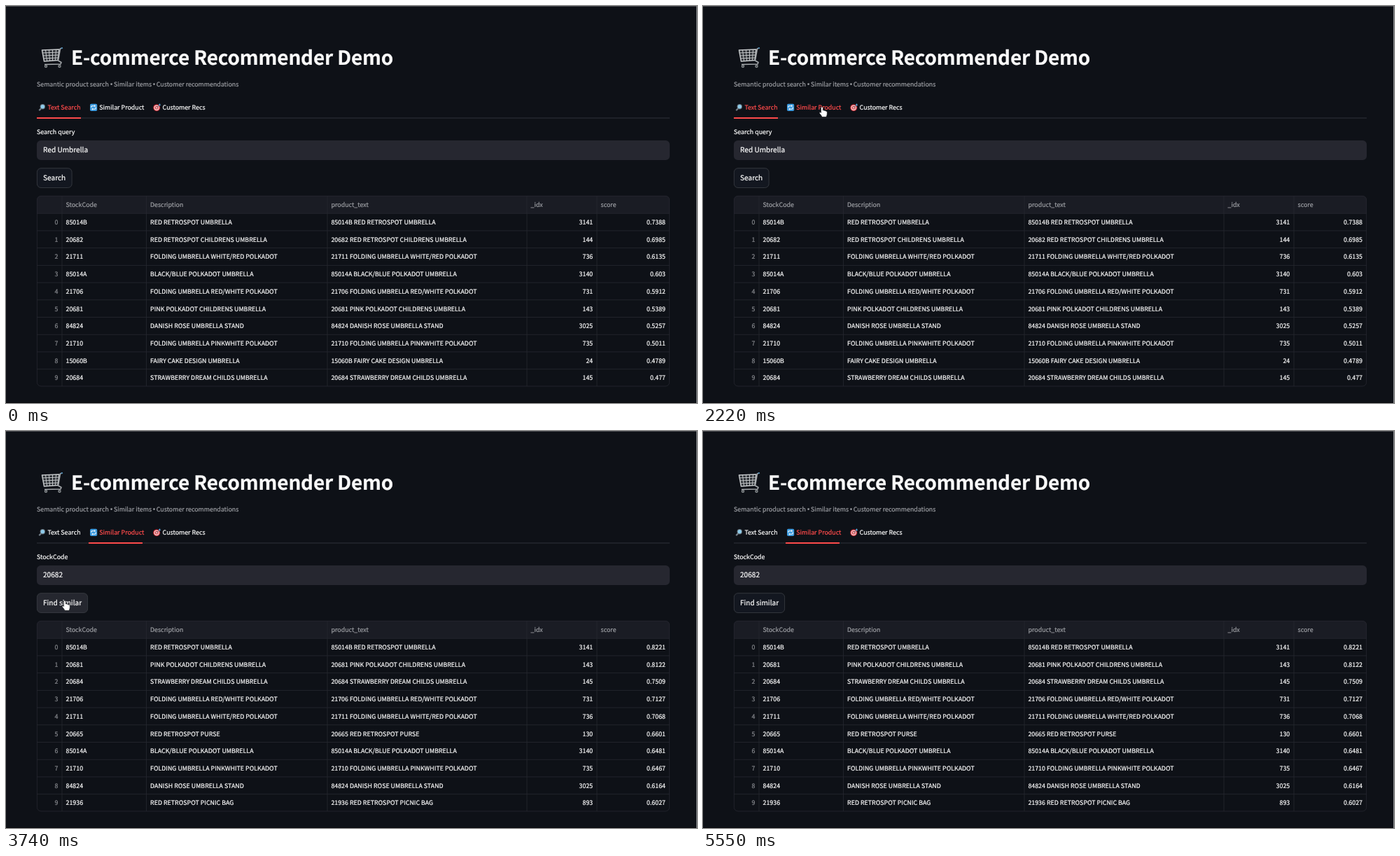
These frames come from a looping animation (987x567 px, 6.21 s). An HTML page with a canvas:

```html
<!DOCTYPE html>
<html lang="en">
<head>
<meta charset="utf-8">
<title>Recommender demo</title>
<style>
  html, body { margin: 0; width: 100%; height: 100%; overflow: hidden; background: #0e1117; }
  canvas { display: block; }
</style>
</head>
<body>
<canvas id="stage" width="987" height="567"></canvas>
<script>
const ctx = document.getElementById('stage').getContext('2d');
const LOOP = 6210;
const FONT = '"Noto Sans CJK JP", "Noto Sans CJK SC", "Noto Sans CJK", "Noto Sans", sans-serif';
const SMALL = 8.85, MEDIUM = 10.1, LARGE = 27.9;
const BG = '#0e1117', WHITE = '#fafafa', GREY = '#9a9ca1', RED = '#ff4b4b';
const LINE = '#262830', PANEL = '#262730', HEADER = '#1a1c24';
const TABLE = { left: 44, right: 948, top: 271, body: 296.2, row: 24.72 };

const PRODUCTS = {
  '85014B': ['RED RETROSPOT UMBRELLA', 3141],
  '20682': ['RED RETROSPOT CHILDRENS UMBRELLA', 144],
  '21711': ['FOLDING UMBRELLA WHITE/RED POLKADOT', 736],
  '85014A': ['BLACK/BLUE POLKADOT UMBRELLA', 3140],
  '21706': ['FOLDING UMBRELLA RED/WHITE POLKADOT', 731],
  '20681': ['PINK POLKADOT CHILDRENS UMBRELLA', 143],
  '84824': ['DANISH ROSE UMBRELLA STAND', 3025],
  '21710': ['FOLDING UMBRELLA PINKWHITE POLKADOT', 735],
  '15060B': ['FAIRY CAKE DESIGN UMBRELLA', 24],
  '20684': ['STRAWBERRY DREAM CHILDS UMBRELLA', 145],
  '20665': ['RED RETROSPOT PURSE', 130],
  '21936': ['RED RETROSPOT PICNIC BAG', 893]
};
const parseResults = s => s.split(' ').map(item => item.split(':'));
const SEARCH = parseResults('85014B:0.7388 20682:0.6985 21711:0.6135 85014A:0.603 21706:0.5912 ' +
  '20681:0.5389 84824:0.5257 21710:0.5011 15060B:0.4789 20684:0.477');
const SIMILAR = parseResults('85014B:0.8221 20681:0.8122 20684:0.7509 21706:0.7127 21711:0.7068 ' +
  '20665:0.6601 85014A:0.6481 21710:0.6467 84824:0.6164 21936:0.6027');

// Screen updates come in bursts: start, end, number of updates.
const BURSTS = [[180, 760, 9], [820, 1440, 10], [1510, 1640, 3], [1860, 2480, 10], [2550, 2940, 7],
  [3080, 3140, 2], [3740, 4330, 10], [4400, 4530, 3], [4670, 4870, 4], [5080, 5210, 3], [5420, 5550, 3]];

// Pointer path: time, x, y.
const PATH = [[180, 330, 556], [260, 322, 480], [470, 300, 400], [760, 285, 350], [1000, 280, 346],
  [1440, 268, 328], [1640, 263, 119], [1860, 258, 121], [2150, 170, 144], [2290, 170, 144],
  [2480, 163, 161], [2940, 83, 241], [3080, 83, 241], [3140, 84, 242], [3740, 84, 242],
  [4330, 224, 298], [4530, 236, 305], [4670, 230, 302], [4737, 240, 300], [4870, 291, 313],
  [5010, 291, 313], [5210, 300, 487], [5350, 300, 487], [5420, 302, 521]];

const SWITCH_TAB = 2270, SLIDE_START = 2290, SLIDE_TIME = 270, SHOW_SIMILAR = 3135, POINTER_OUT = 5480;

function heldTime(t) {
  let held = 0;
  for (const [start, end, count] of BURSTS) {
    if (t < start) break;
    const step = (end - start) / (count - 1);
    held = start + step * Math.min(count - 1, Math.floor((t - start) / step + 0.15));
  }
  return held;
}

function pointerAt(t) {
  if (t < PATH[0][0] || t >= POINTER_OUT) return null;
  const next = PATH.findIndex(key => key[0] > t);
  if (next < 0) return { x: PATH.at(-1)[1], y: PATH.at(-1)[2] };
  const [t0, x0, y0] = PATH[next - 1], [t1, x1, y1] = PATH[next];
  const p = (t - t0) / (t1 - t0);
  return { x: x0 + (x1 - x0) * p, y: y0 + (y1 - y0) * p };
}

// A hairline stroke gives the slightly heavy look of the interface type.
function text(str, x, y, size = SMALL, color = WHITE, align = 'left', weight = 400) {
  ctx.font = `${weight} ${size}px ${FONT}`;
  ctx.fillStyle = ctx.strokeStyle = color;
  ctx.lineWidth = 0.22;
  ctx.textAlign = align;
  ctx.fillText(str, x, y);
  ctx.strokeText(str, x, y);
}

function rect(x, y, w, h, color) {
  ctx.fillStyle = color;
  ctx.fillRect(x, y, w, h);
}

function box(x, y, w, h, r, fill, stroke) {
  ctx.beginPath();
  ctx.roundRect(x, y, w, h, r);
  if (fill) { ctx.fillStyle = fill; ctx.fill(); }
  if (stroke) { ctx.strokeStyle = stroke; ctx.lineWidth = 0.8; ctx.stroke(); }
}

function disc(x, y, r, color) {
  ctx.beginPath();
  ctx.arc(x, y, r, 0, Math.PI * 2);
  ctx.fillStyle = color;
  ctx.fill();
}

function path(d, stroke, width, fill) {
  const shape = new Path2D(d);
  if (fill) { ctx.fillStyle = fill; ctx.fill(shape); }
  ctx.strokeStyle = stroke;
  ctx.lineWidth = width;
  ctx.stroke(shape);
}

function drawCart() {
  path('M51.5 63L76 62L74 77.5L54.5 79Z', '#c3c6c8', 1.5, '#2b2f34');
  path('M56.5 63L58.5 78.5M61.5 63L62.5 78.5M66.5 62.5L66.5 78M71.5 62.5L70.5 78', '#c3c6c8', 1);
  path('M52 67L75.5 66M53 71L75 70M53.8 75L74.5 74', '#c3c6c8', 1);
  path('M80.5 60L77.5 61L74.5 78L79 80.5L78 83L55 83.5', '#a4a8ab', 1.6);
  path('M78.5 60.5L81 59.7', '#4a8db8', 1.6);
  for (const x of [57, 76.5]) {
    disc(x, 86, 2.2, '#8f9497');
    disc(x, 86, 0.9, '#2a2d31');
  }
}

function drawTabIcons() {
  path('M50.4 146L47.3 149.2', '#75808a', 2.2);
  disc(52.3, 143.7, 3.7, '#68747d');
  disc(52.3, 143.7, 2.7, '#8fcdec');

  box(120, 139.8, 10.2, 10.2, 1.8, '#3c9be0');
  path('M122 145V143.5Q122 142.7 123 142.7H127M128.2 144.6V146.3Q128.2 147.2 127.2 147.2H123.3', WHITE, 1.1);
  path('M126.3 141.3L128 142.7L126.3 144ZM124 145.9L122.3 147.2L124 148.6Z', WHITE, 0.3, WHITE);

  [[4.9, '#d9363e'], [3.6, '#f0e8e8'], [2.5, '#d9363e'], [1.2, '#f0e8e8']]
    .forEach(([r, color]) => disc(215.2, 145.3, r, color));
  path('M215.2 145.3L219.1 141.4', '#53616d', 1);
  path('M218.4 142L218.7 140.3L220 139.6L219.9 141L220.9 141.2L220 142.3Z', '#5aa9dc', 0.4, '#5aa9dc');
}

function drawHeading() {
  drawCart();
  ctx.letterSpacing = '-0.15px';
  text('E-commerce Recommender Demo', 92.9, 84.2, LARGE, WHITE, 'left', 700);
  ctx.letterSpacing = '0px';
  text('Semantic product search', 44, 114.8, SMALL, GREY);
  text('Similar items', 154, 114.8, SMALL, GREY);
  text('Customer recommendations', 214.8, 114.8, SMALL, GREY);
  disc(150.6, 111.6, 1.35, GREY);
  disc(211.5, 111.6, 1.35, GREY);
}

function drawTabs(t, right, overSimilar) {
  const similar = t >= SWITCH_TAB;
  drawTabIcons();
  text('Text Search', 59.4, 148.3, SMALL, similar ? WHITE : RED);
  text('Similar Product', 133.3, 148.3, SMALL, similar || overSimilar ? RED : WHITE);
  text('Customer Recs', 223.6, 148.3);
  rect(44, 159.3, right - 44, 1.4, LINE);
  const p = Math.max(0, Math.min(1, (t - SLIDE_START) / SLIDE_TIME));
  const ease = p * p * (3 - 2 * p);
  rect(44 + 74 * ease, 159, 63 + 14 * ease, 2, RED);
}

function drawForm(label, value, action, width, right, hovered) {
  text(label, 44, 183.4);
  box(44, 192, right - 44, 28, 5.6, PANEL);
  text(value, 53, 209.3, MEDIUM);
  box(44.4, 231.7, width - 0.8, 27.8, 5.6, hovered ? '#25272f' : '#131720', '#3c3f46');
  text(action, 53, 249.2, MEDIUM);
}

function drawToolbar() {
  box(895, 248, 53, 18, 5, '#13161e');
  path('M905.3 253.4V258M903.3 256.3L905.3 258.3L907.3 256.3M902.2 258.6V260.4H908.4V258.6', WHITE, 1.1);
  path('M922.7 256a2.3 2.3 0 1 1-4.6 0a2.3 2.3 0 1 1 4.6 0M922.1 257.7L924.8 260.4', WHITE, 1.2);
  path('M934.2 256V254H936.2M938 254H940V256M940 258.2V260.2H938M936.2 260.2H934.2V258.2', WHITE, 1.1);
}

function drawTable(results, hoverRow) {
  const { left, right, top, body, row } = TABLE;
  const bottom = body + row * 10;
  ctx.save();
  box(left, top, right - left, bottom - top, 5.6);
  ctx.clip();
  rect(left, top, right - left, body - top, HEADER);
  if (hoverRow >= 0) rect(left, body + row * hoverRow, right - left, row, '#15181f');
  for (let i = 0; i < 10; i++) rect(left, body + row * i - 0.4, right - left, 0.8, LINE);
  for (const x of [80, 200.5, 459, 744, 844]) rect(x - 0.4, top, 0.8, bottom - top, LINE);
  ctx.restore();
  box(left + 0.4, top + 0.4, right - left - 0.8, bottom - top - 0.8, 5.6, null, LINE);

  [['StockCode', 85.5], ['Description', 206], ['product_text', 464.5], ['_idx', 749.5], ['score', 849.5]]
    .forEach(([name, x]) => text(name, x, 287.3, SMALL, GREY));
  results.forEach(([code, score], i) => {
    const [name, index] = PRODUCTS[code];
    const y = body + row * (i + 0.5) + 3.4;
    text(i, 74.3, y, SMALL, '#85878c', 'right');
    text(code, 85.5, y);
    text(name, 206.1, y);
    text(`${code} ${name}`, 464.4, y);
    text(index, 838.2, y, SMALL, WHITE, 'right');
    text(score, 942, y, SMALL, WHITE, 'right');
  });
}

function drawPointer({ x, y }, hand) {
  ctx.save();
  ctx.translate(x, y);
  if (hand) {
    path('M-1.5 1Q0 -1 1.3 1V5Q2.5 4.2 3.5 5.5Q5 5 5.5 6.2Q7.2 6 7.3 7.6V10.5Q7 12.5 6 14.5H0' +
      'Q-1 12 -3.5 9.5Q-4.3 7.6 -2.8 7.4L-1.5 8.5Z', '#15171b', 0.7, '#fff');
  } else {
    path('M0 0V11.6L2.6 9.2L4.3 13L6.1 12.2L4.5 8.5L8.1 8.3Z', '#15171b', 0.6, '#fff');
  }
  ctx.restore();
}

function draw(t) {
  const pointer = pointerAt(t);
  const over = (x0, x1, y0, y1) => !!pointer && pointer.x >= x0 && pointer.x <= x1 && pointer.y >= y0 && pointer.y <= y1;
  const similar = t >= SWITCH_TAB;
  const results = !similar ? SEARCH : t >= SHOW_SIMILAR ? SIMILAR : null;
  const right = results ? 948 : 955;
  const overSimilar = over(118, 199, 136, 158);
  const buttonWidth = similar ? 73 : 50.5;
  const overButton = over(44, 44 + buttonWidth, 231, 260);

  rect(0, 0, 987, 567, BG);
  rect(0, 0, 987, 1, '#45474c');
  rect(986, 0, 1, 567, '#85878a');
  rect(0, 566, 986, 1, '#08090c');

  drawHeading();
  drawTabs(t, right, overSimilar);
  if (similar) drawForm('StockCode', '20682', 'Find similar', buttonWidth, right, overButton);
  else drawForm('Search query', 'Red Umbrella', 'Search', buttonWidth, right, overButton);

  if (results) {
    const overTable = over(44, 948, TABLE.top, 543);
    const hoverRow = overTable ? Math.floor((pointer.y - TABLE.body) / TABLE.row) : -1;
    drawTable(results, hoverRow);
    if (overTable) drawToolbar();
  }
  if (pointer) drawPointer(pointer, overSimilar || overButton);
}

ctx.textRendering = 'geometricPrecision';
ctx.lineJoin = 'round';
const startTime = performance.now();
function tick() {
  draw(heldTime((performance.now() - startTime) % LOOP));
  requestAnimationFrame(tick);
}
tick();
</script>
</body>
</html>
```
